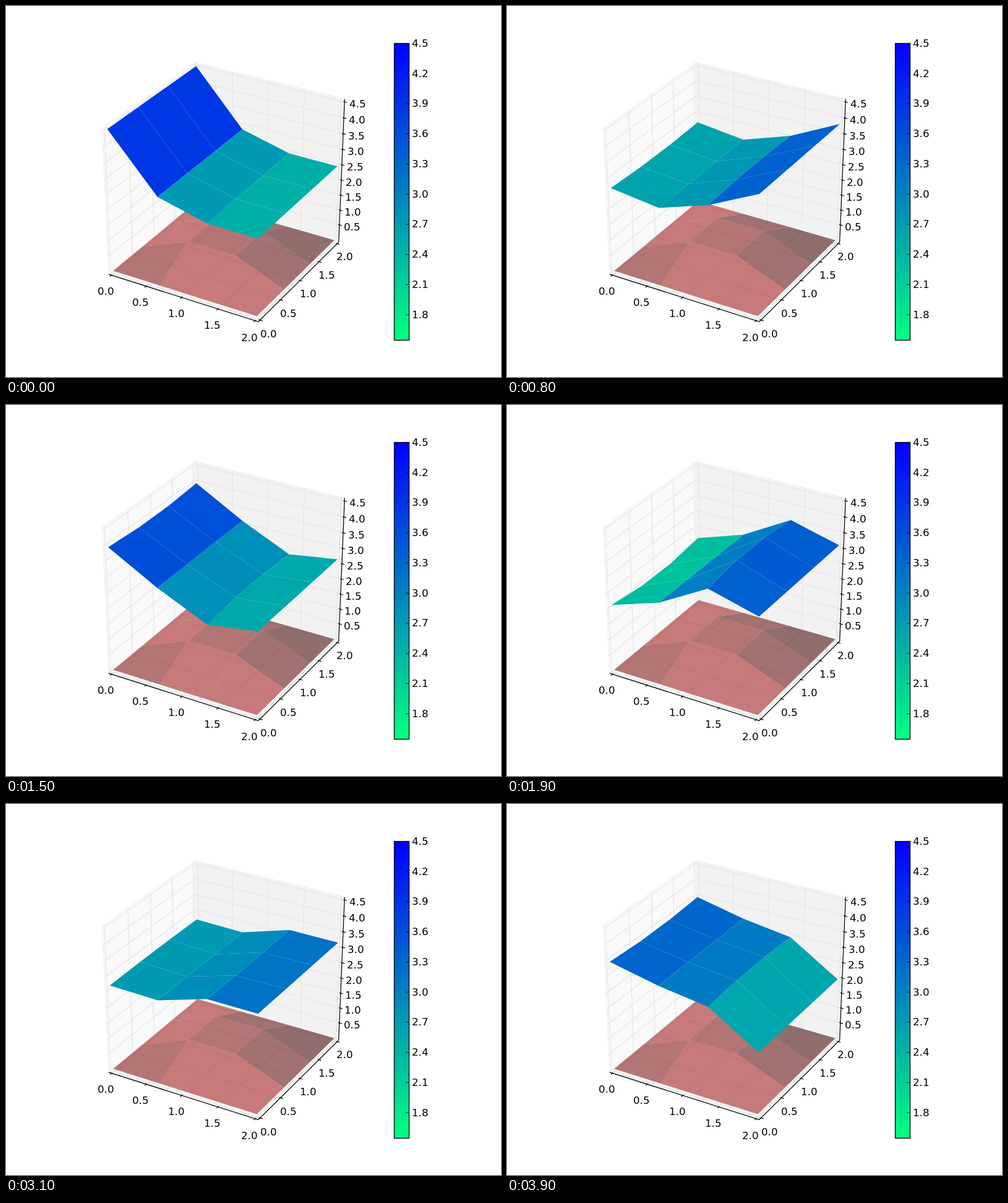
An HTML page that plays this animation: 800 px wide and 600 px high, repeating every 4000 ms.

```html
<!DOCTYPE html>
<html lang="en">
<head>
<meta charset="utf-8">
<title>Sloshing surface</title>
<style>
  html, body { margin: 0; width: 100%; height: 100%; overflow: hidden; background: #fff; }
  svg { display: block; }
  text { font: 16.67px "DejaVu Sans", sans-serif; fill: #000; }
</style>
</head>
<body>
<svg id="stage" width="800" height="600" viewBox="0 0 800 600">
  <defs>
    <linearGradient id="ramp" x1="0" y1="0" x2="0" y2="1">
      <stop offset="0" stop-color="#0000ff"/>
      <stop offset="1" stop-color="#00ff80"/>
    </linearGradient>
  </defs>
</svg>
<script>
const stage = document.getElementById('stage');
const LOOP = 4000, STEP = 100;
const Z_TOP = 4.5, Z_LOW = 1.548;
const E = 0.5 + 1 / 48;

function add(tag, attrs, text) {
  const el = document.createElementNS('http://www.w3.org/2000/svg', tag);
  for (const k in attrs) el.setAttribute(k, attrs[k]);
  if (text !== undefined) el.textContent = text;
  return stage.appendChild(el);
}

// Perspective view of the unit cube: azimuth -60, elevation 30, distance 10.
function project([x, y, z]) {
  const s3 = Math.sqrt(3);
  const depth = 10 - (s3 / 4 * x - 0.75 * y + z / 2);
  const u = (s3 * x + y) / 2 / depth;
  const v = (-x / 4 + s3 / 4 * y + s3 / 2 * z) / depth;
  return [354.7 + u * 2681, 293.5 - v * 2594.6];
}
const path = pts => pts.map(p => project(p).map(n => n.toFixed(2)).join()).join(' ');
const line = (pts, color, width) =>
  add('polyline', { points: path(pts), fill: 'none', stroke: color, 'stroke-width': width });
const label = (left, middle, value) =>
  add('text', { x: Math.round(left), y: Math.round(middle + 5.5) }, value.toFixed(1));
const span = value => value / 2 - 0.5;
const rise = value => value / Z_TOP - 0.5;
const range = (n, f) => Array.from({ length: n }, (_, i) => f(i));

// Walls, floor and grid
[
  ['#f9f9f9', [[-E, -E, -E], [-E, E, -E], [-E, E, E], [-E, -E, E]]],
  ['#f2f2f2', [[-E, E, -E], [E, E, -E], [E, E, E], [-E, E, E]]],
  ['#f5f5f5', [[-E, -E, -E], [E, -E, -E], [E, E, -E], [-E, E, -E]]]
].forEach(([fill, pts]) =>
  add('polygon', { points: path(pts), fill, stroke: '#efefef', 'stroke-width': 1 }));

const flatTicks = range(5, i => i / 2);
const highTicks = range(9, i => (i + 1) / 2);
const GRID = '#e6e6e6';
flatTicks.map(span).forEach(p => {
  line([[p, -E, -E], [p, E, -E], [p, E, E]], GRID, 1.3);
  line([[E, p, -E], [-E, p, -E], [-E, p, E]], GRID, 1.3);
});
highTicks.map(rise).forEach(p => line([[-E, -E, p], [-E, E, p], [E, E, p]], GRID, 1.3));

// Axes, ticks and their labels
line([[-E, -E, -E], [E, -E, -E], [E, E, -E], [E, E, E]], '#000', 1.2);
const OUT = E + 0.2 / 12, IN = E - 0.1 / 12;
function tick(a, b, at, value) {
  line([a, b], '#000', 1.2);
  const [x, y] = project(at);
  label(x - 13.25, y, value);
}
flatTicks.forEach(v => {
  const p = span(v);
  tick([p, -OUT, -E], [p, -IN, -E], [p, -0.586, -0.604], v);
  tick([OUT, p, -E], [IN, p, -E], [0.577, p, -0.605], v);
});
highTicks.forEach(v => {
  const p = rise(v);
  tick([OUT, E, p], [IN, E, p], [0.602, 0.535, p], v);
});

// Colour bar
add('rect', { x: 627.5, y: 60.5, width: 24, height: 480, fill: 'url(#ramp)', stroke: '#000', 'stroke-width': 1.3 });
range(10, i => Z_TOP - i * 0.3).forEach(v => {
  const y = 60.3 + (Z_TOP - v) / (Z_TOP - Z_LOW) * 480;
  add('path', { d: `M646 ${y}H651`, stroke: '#000', 'stroke-width': 0.7 });
  label(656, y, v);
});

// Both meshes are 4 x 4 points, drawn from far to near.
const node = i => i / 3 - 0.5;
const inner = k => k === 1 || k === 2;
const cells = [];
for (let j = 2; j >= 0; j--) for (let i = 0; i < 3; i++) cells.push([i, j]);
const corners = ([i, j]) => [[i, j], [i + 1, j], [i + 1, j + 1], [i, j + 1]];

// Sea bed: a raised block, darker where it slopes away from the light
const hump = (i, j) => inner(i) && inner(j) ? 1 : 0;
cells.forEach(c => {
  const [i, j] = c;
  const dark = 1 + 2 * hump(i, j) - hump(i + 1, j) - hump(i, j + 1);
  const low = Math.max(0, 22 - 8 * dark);
  add('polygon', {
    points: path(corners(c).map(([a, b]) => [node(a), node(b), 0.14 * hump(a, b) - 0.5])),
    fill: `rgb(${160 - 32 * dark},${low},${low})`,
    'fill-opacity': 0.55
  });
});

// Water: three standing waves across the basin and a ripple on the inner rows
const wave = (t, period) => Math.cos(2 * Math.PI * t / period);
const shape = (k, i) => Math.cos(k * Math.PI * (i + 0.5) / 4);

function height(t, i, j) {
  const slosh = 0.05 + 0.86 * wave(t, 1.35) + 0.12 * wave(t, 1.35 / 2);
  const bulge = (0.41 + 0.18 * Math.exp(-5 * t)) * wave(t, 0.73);
  const chop = 0.03 + 0.19 * wave(t, 0.64);
  const ripple = inner(j) ? 0.15 * Math.sin(2 * Math.PI * t / 0.515) : 0;
  return 2.94 + slosh * shape(1, i) + bulge * (0.25 + shape(2, i)) + chop * shape(3, i)
    + ripple * Math.cos(Math.PI * i / 2);
}

function tone(z) {
  const p = Math.min(1, Math.max(0, (Z_TOP - z) / (Z_TOP - Z_LOW)));
  return `rgb(0,${Math.round(255 * p)},${Math.round(255 - 127.5 * p)})`;
}

const sheet = cells.map(() => add('polygon', {}));

function draw(t) {
  cells.forEach((c, n) => {
    const pts = corners(c);
    const z = pts.map(([i, j]) => height(t, i, j));
    sheet[n].setAttribute('points', path(pts.map(([i, j], k) => [node(i), node(j), rise(z[k])])));
    // The closed outline counts its first corner twice.
    sheet[n].setAttribute('fill', tone((2 * z[0] + z[1] + z[2] + z[3]) / 5));
  });
}

const start = performance.now();
function loop() {
  const t = (performance.now() - start) % LOOP;
  draw(Math.floor(t / STEP) * STEP / 1000);
  requestAnimationFrame(loop);
}
loop();
</script>
</body>
</html>
```
